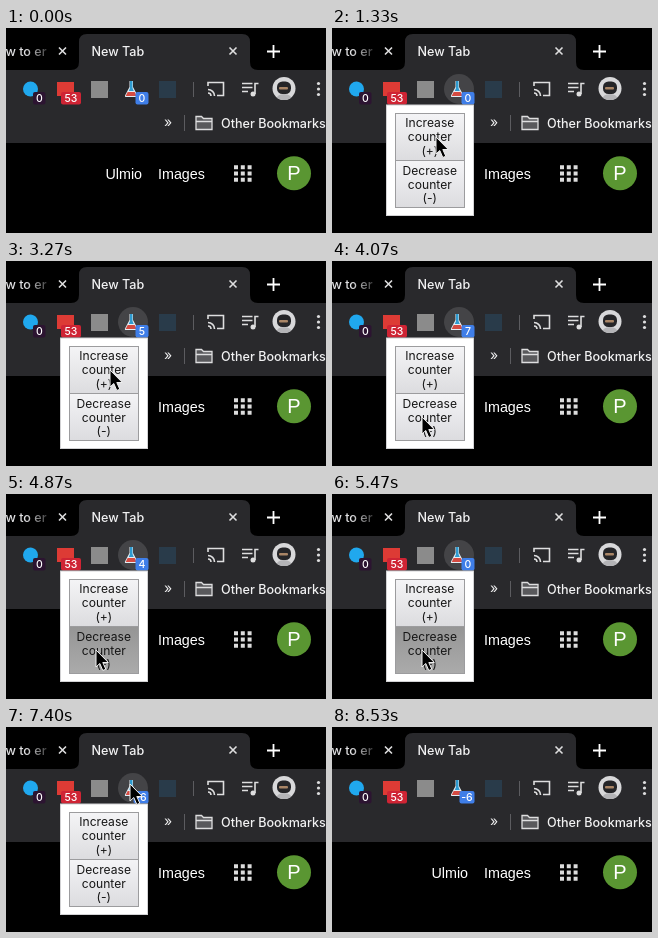
An HTML page that plays this animation: 320 by 205 pixels, repeating every 9.59 s.

```html
<!DOCTYPE html>
<html lang="en">
<head>
<meta charset="utf-8">
<title>Counter extension</title>
<style>
  html, body { margin: 0; width: 100%; height: 100%; overflow: hidden; background: #000; }
  svg { display: block; width: 100%; height: 100%; }
  text { font-family: Inter, sans-serif; fill: #f1f1f2; }
  .ui { font-size: 12.6px; font-weight: 500; }
  .page { font-family: "Liberation Sans", Arial, sans-serif; font-size: 14.3px; fill: #fff; }
  .badge text { font-size: 10.5px; font-weight: 500; text-anchor: middle; fill: #fff; }
  .button rect { fill: url(#idle); stroke: #9c9c9e; }
  .button.down rect { fill: url(#pressed); }
  .button text { font-size: 12.1px; text-anchor: middle; fill: #161616; }
  .line { fill: none; stroke: #dededf; stroke-width: 1.6; }
</style>
</head>
<body>
<svg viewBox="0 0 320 205">
  <defs>
    <linearGradient id="idle" x2="0" y2="1">
      <stop stop-color="#f4f4f6"/><stop offset="1" stop-color="#dcdcdf"/>
    </linearGradient>
    <linearGradient id="pressed" x2="0" y2="1">
      <stop stop-color="#959595"/><stop offset="1" stop-color="#ababab"/>
    </linearGradient>
    <linearGradient id="fade" gradientUnits="userSpaceOnUse" x1="20" x2="46">
      <stop stop-color="#e0e0e2"/><stop offset="1" stop-color="#e0e0e2" stop-opacity=".1"/>
    </linearGradient>
    <clipPath id="chrome"><rect width="320" height="115"/></clipPath>
    <clipPath id="face"><circle cx="278" cy="60.5" r="11.5"/></clipPath>
  </defs>

  <rect width="320" height="205"/>

  <!-- Tab strip and toolbar -->
  <path fill="#29292c" d="M0 42H65Q73 42 73 34V14Q73 6 81 6H236Q244 6 244 14V34Q244 42 252 42H320V115H0Z"/>
  <text class="ui" x="-8" y="27.5" style="fill:url(#fade)">ow to er</text>
  <text class="ui" x="85.5" y="27.5">New Tab</text>
  <path class="line" d="M53 19.5l7 7m0-7l-7 7M223.500 19.5l7 7m0-7l-7 7"/>
  <path class="line" style="stroke:#fff;stroke-width:1.800" d="M261 23.500h13M267.500 17v13"/>

  <!-- Extension icons -->
  <circle cx="24.500" cy="61" r="7.500" fill="#20a8ee"/>
  <rect x="51" y="54" width="17" height="14" fill="#dd3b35"/>
  <rect x="85" y="53" width="17" height="17" fill="#8b8b8b"/>
  <rect x="153" y="53" width="17" height="17" fill="#293b4a"/>
  <circle id="hover" cx="127" cy="61" r="15" fill="#444447"/>
  <path d="M123.500 53h3.500v6l4.500 8.500q.500 1.500-1 1.500h-10.500q-1.500 0-1-1.500l4.500-8.500Z" fill="#e4eef5"/>
  <path d="M124 53h2.500v7l1.300 3h-5l1.200-3Z" fill="#2f9bd0"/>
  <path d="M121.700 64h7l2 4h-11Z" fill="#d54b42"/>
  <g class="badge">
    <rect x="27" y="64" width="12.500" height="12.500" rx="2" fill="#2c1431"/><text x="33.300" y="74.200">0</text>
    <rect x="55" y="64" width="20" height="12.500" rx="2" fill="#cf2434"/><text x="65" y="74.200">53</text>
    <rect id="countBox" y="64" height="12.500" rx="2" fill="#3f7ee8"/><text id="count" y="74.200">0</text>
  </g>

  <!-- Toolbar controls -->
  <path d="M187.500 54v15M178.500 87v16" stroke="#5c5c60"/>
  <path class="line" d="M202 58v-3.500h15.500v13H211M202 61.500a6.500 6.500 0 0 1 6.500 6.500M202 65a3 3 0 0 1 3 3"/>
  <path class="line" d="M236 55.500h10.500M236 59.500h10.500M236 63.500h6M249 66v-10.500h3.500"/>
  <circle cx="247" cy="66" r="2.500" fill="#dededf"/>
  <g clip-path="url(#face)">
    <rect x="266" y="49" width="24" height="24" fill="#d8d8da"/>
    <path d="M269 74q1-8 9-8t9 8Z" fill="#b4b4b7"/>
    <rect x="271" y="53.500" width="14" height="12.500" rx="5.500" fill="#252528"/>
    <rect x="273" y="59" width="9" height="2.500" rx="1" fill="#a98566"/>
  </g>
  <g fill="#dededf"><circle cx="312.500" cy="55.500" r="1.600"/><circle cx="312.500" cy="61" r="1.600"/><circle cx="312.500" cy="66.500" r="1.600"/></g>
  <text x="158" y="99" style="font-size:14px">»</text>
  <path class="line" style="stroke-width:1.300;fill:#59595c" d="M190 101.500V88.500h5.500l2 2h8.500v11ZM190 93.500h16"/>
  <text class="ui" x="215" y="99.500">Other Bookmarks</text>

  <!-- Page -->
  <text class="page" x="99.500" y="150.500">Ulmio</text>
  <text class="page" x="152" y="150.500">Images</text>
  <path d="M228 139.300h18M228 145.500h18M228 151.700h18" stroke="#dcdcdc" stroke-width="4" stroke-dasharray="4 2.800"/>
  <circle cx="288" cy="145.300" r="17" fill="#5a9632"/>
  <text class="page" x="288" y="152" text-anchor="middle" style="font-size:20px">P</text>

  <!-- Popup -->
  <g id="popup">
    <rect x="54.500" y="77" width="87" height="110.500" fill="#fff" stroke="#d2d2d4"/>
    <g class="button" id="plus">
      <rect x="63.500" y="85.500" width="69" height="47"/>
      <text x="97.800" y="99.300">Increase</text><text x="97.800" y="113.300">counter</text><text x="97.800" y="127.200">(+)</text>
    </g>
    <g class="button" id="minus">
      <rect x="63.500" y="132.500" width="69" height="47"/>
      <text x="97.800" y="146.500">Decrease</text><text x="97.800" y="160.500">counter</text><text x="97.800" y="174.200">(-)</text>
    </g>
  </g>

  <g id="cursorClip">
    <path id="cursor" d="M0 0V17l3.800-3.500 3 7 3-1.300-3-6.700h5.500Z" stroke="#f0f0f0"/>
  </g>
</svg>
<script>
  const LOOP = 9590, STEP = 1000 / 15;
  const OPEN = 1000, CLOSE = 7600;
  const $ = id => document.getElementById(id);

  // Cursor tip: time, x, y
  const path = [
    [400, 97, 118], [800, 124, 57], [1060, 124, 57], [1330, 104, 109],
    [3860, 104, 109], [4060, 90, 156], [6600, 90, 156], [7000, 124, 57],
    [7860, 124, 57], [8260, 97, 118]
  ];

  // Presses: time down, time up
  const plusClicks = [[1800, 2130], [2670, 2730], [2800, 2870], [2930, 3000],
    [3070, 3270], [3330, 3470], [3530, 3600]];
  const minusClicks = [[4330, 4400], [4470, 4530], [4600, 4670], [4870, 4930],
    [5070, 5130], [5190, 5250], [5300, 5360], [5420, 5480], [5540, 5600],
    [5930, 6000], [6070, 6130], [6200, 6270], [6330, 6470]];
  const idlePress = [2270, 2330];

  const held = (clicks, t) => clicks.some(([down, up]) => t >= down && t < up);
  const done = (clicks, t) => clicks.filter(([, up]) => t >= up).length;

  function cursorAt(t) {
    const next = path.findIndex(([time]) => time > t);
    if (next <= 0) return path[next < 0 ? path.length - 1 : 0].slice(1);
    const [t0, x0, y0] = path[next - 1], [t1, x1, y1] = path[next];
    const p = (t - t0) / (t1 - t0), ease = p * p * (3 - 2 * p);
    return [x0 + (x1 - x0) * ease, y0 + (y1 - y0) * ease];
  }

  function draw(t) {
    const open = t >= OPEN && t < CLOSE;
    const value = done(plusClicks, t) - done(minusClicks, t);
    const width = value < 0 ? 15 : 13;

    $('popup').style.display = open ? '' : 'none';
    $('plus').classList.toggle('down', held([...plusClicks, idlePress], t));
    $('minus').classList.toggle('down', held(minusClicks, t));

    $('count').textContent = value;
    $('count').setAttribute('x', 142.5 - width / 2);
    $('countBox').setAttribute('x', 142.5 - width);
    $('countBox').setAttribute('width', width);

    const glow = Math.min((t - 670) / 200, (8270 - t) / 270, 1);
    $('hover').setAttribute('opacity', Math.max(0, glow));

    // The pointer is lost against the black page unless the popup is behind it
    $('cursorClip').setAttribute('clip-path', open ? 'none' : 'url(#chrome)');
    const [x, y] = cursorAt(Math.floor((t + 4) / STEP) * STEP);
    $('cursor').setAttribute('transform', `translate(${x} ${y})`);
    $('cursor').style.display = t < 470 || t >= 8270 ? 'none' : '';
  }

  const start = performance.now();
  function frame() {
    draw((performance.now() - start) % LOOP);
    requestAnimationFrame(frame);
  }
  frame();
</script>
</body>
</html>
```
